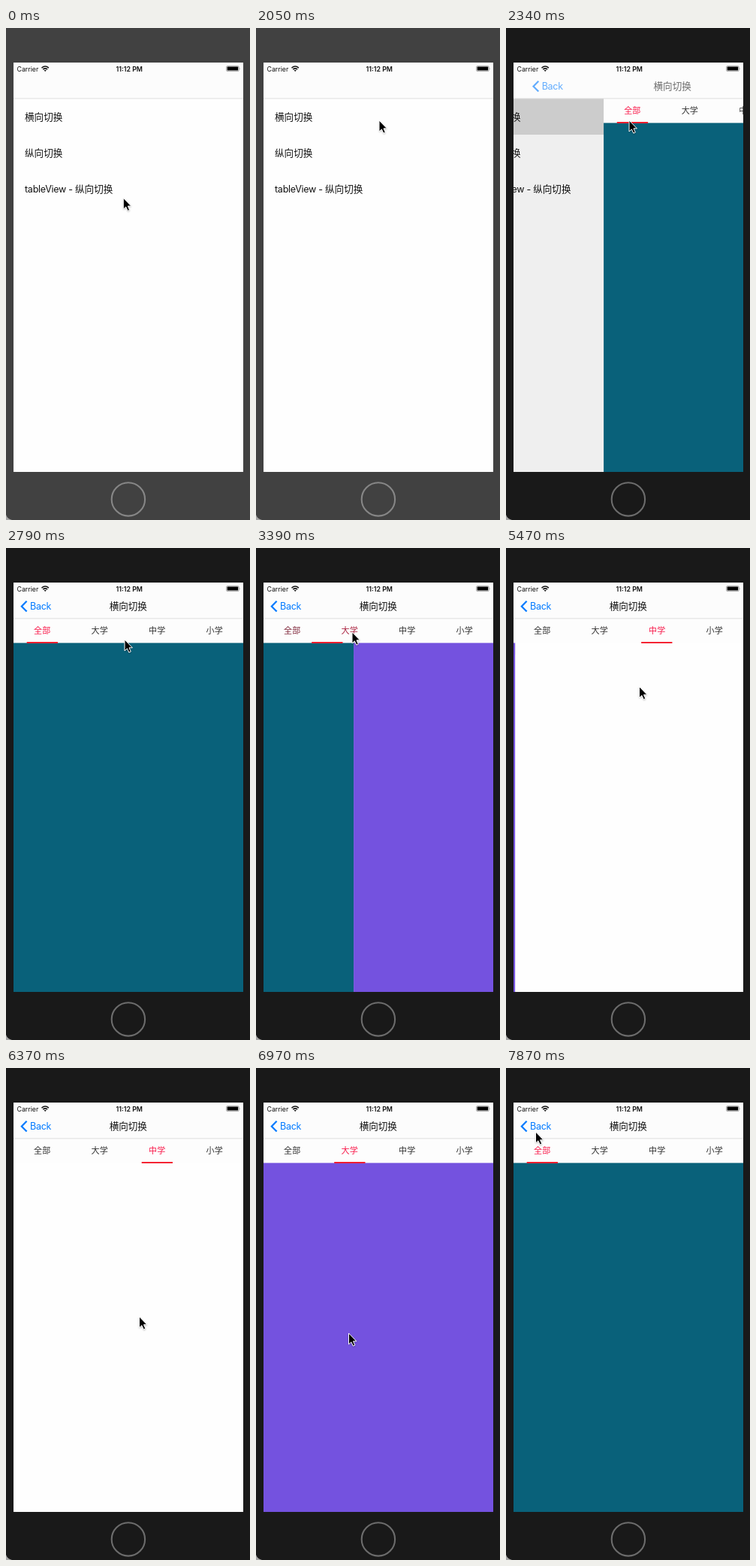
An HTML page that plays this animation: 325x655 px, repeating every 8000 ms.

```html
<!DOCTYPE html>
<html lang="zh-CN">
<head>
<meta charset="utf-8">
<style>
html, body { margin: 0; width: 100%; height: 100%; overflow: hidden; background: #191919; }
svg { display: block; width: 325px; height: 655px; }
text { font-family: Inter, "Noto Sans CJK SC", "Noto Sans CJK", sans-serif; font-size: 12.57px; fill: #111; }
.latin { letter-spacing: -.3px; }
.status { font-size: 8.8px; }
.tab { font-size: 11.1px; text-anchor: middle; }
.mid { text-anchor: middle; }
</style>
</head>
<body>
<svg viewBox="0 0 325 655">
  <defs>
    <clipPath id="screen"><rect x="10" y="46" width="306" height="545"/></clipPath>
    <filter id="soft" x="-50%" y="-50%" width="200%" height="200%"><feGaussianBlur stdDeviation=".8"/></filter>
  </defs>
  <rect id="bezel" width="325" height="655"/>
  <path d="M0 648Q2 653.5 8 655H0Z" fill="#a5a5a5"/>
  <circle id="home" cx="162.9" cy="627.4" r="22.2" fill="none" stroke-width="2.1"/>
  <g clip-path="url(#screen)">
    <rect x="10" y="46" width="306" height="545" fill="#fefefe"/>
    <g id="list">
      <rect x="10" y="94" width="306" height="497" fill="#fefefe"/>
      <rect id="pressed" x="10" y="94" width="306" height="48" fill="#d9d9d9"/>
      <text x="25" y="122.6">横向切换</text>
      <text x="25" y="170.6">纵向切换</text>
      <text x="25" y="218.6"><tspan class="latin">tableView - </tspan><tspan x="92">纵向切换</tspan></text>
    </g>
    <rect id="shade" x="10" y="94" width="306" height="497"/>
    <g id="detail">
      <rect x="10" y="94" width="306" height="33" fill="#fdfdfd"/>
      <g id="pages"></g>
      <g id="tabs"></g>
      <rect id="bar" y="125" width="41.3" height="1.8" fill="#f40f20"/>
    </g>
    <rect x="10" y="46" width="306" height="48" fill="#fcfcfc"/>
    <rect x="10" y="93.4" width="306" height="1" fill="#dedede"/>
    <g id="nav">
      <path d="M27.6 70.8L20.8 77.7L27.6 84.6" fill="none" stroke="#007aff" stroke-width="2.2"/>
      <text class="latin" x="32" y="82.2" style="fill:#007aff">Back</text>
    </g>
    <text id="title" class="mid" x="162.8" y="82" font-weight="500">横向切换</text>
    <text class="status" x="14.5" y="57.5">Carrier</text>
    <text class="status mid" x="164.2" y="57.5" font-weight="600">11:12 PM</text>
    <g fill="none" stroke="#111" stroke-width="1.5">
      <path d="M47.5 53.1Q52.2 48.9 56.9 53.1M49.3 55.1Q52.2 52.6 55.1 55.1"/>
      <path d="M52.2 58L50.6 56.3Q52.2 55 53.8 56.3Z" fill="#111" stroke="none"/>
    </g>
    <rect x="293.5" y="50.6" width="16.8" height="7" rx="1.5" fill="none" stroke="#888" stroke-width=".7"/>
    <rect x="294.6" y="51.6" width="14.6" height="5" rx=".7"/>
    <path d="M311 52.9Q312.3 54.1 311 55.3Z" fill="#888"/>
  </g>
  <g id="cursor">
    <path d="M0 1V16L3.6 13L6 18.5L8.6 17.3L6.2 12H11Z" opacity=".3" filter="url(#soft)"/>
    <path d="M0 0V14.9L3.4 11.8L5.8 17.1L8.3 16L6 10.8H10.4Z" stroke="#fff" stroke-linejoin="round"/>
  </g>
</svg>
<script>
const LOOP = 8000, STEP = 150, PHASE = 70, TAP = 2170, W = 306, TAB = W / 4;
const $ = id => document.getElementById(id);

// Moves are [start, end, ...values to reach]
const pointer = [
  [900, 1480, 163, 144], [1630, 2020, 164, 123], [2470, 2770, 158, 122],
  [2770, 3070, 128, 112], [3520, 3970, 209, 139], [3970, 4270, 201, 126],
  [5170, 5470, 177.5, 184.5], [5470, 6070, 124, 314],
  [6220, 6670, 200, 338], [6670, 6970, 123.5, 353],
  [7120, 7420, 190, 335], [7420, 7870, 39.5, 85]
];
const scroll = [[3220, 3780, 1], [5020, 5580, 2], [6370, 6930, 1], [7270, 7830, 0]];
const push = [[TAP, 2730, 1]];

const easeOut = f => 1 - (1 - f) ** 3;
const clamp = f => Math.min(1, Math.max(0, f));

// Ease from the first position through each move in turn
function follow(first, moves, t) {
  return moves.reduce((pos, [a, b, ...to]) => {
    const f = easeOut(clamp((t - a) / (b - a)));
    return pos.map((v, i) => v + (to[i] - v) * f);
  }, first);
}

const mix = (a, b, f) => `rgb(${a.map((v, i) => Math.round(v + (b[i] - v) * f))})`;
const move = (id, x, y = 0) => $(id).setAttribute("transform", `translate(${x} ${y})`);
const set = (id, name, value) => $(id).setAttribute(name, value);

$("pages").innerHTML = ["#09617a", "#7452df", "#fefefe"].map((c, i) =>
  `<rect x="${10 + i * W}" y="126.4" width="${W}" height="465" fill="${c}"/>`).join("");
$("tabs").innerHTML = ["全部", "大学", "中学", "小学"].map((s, i) =>
  `<text class="tab" x="${48.2 + i * TAB}" y="114.2">${s}</text>`).join("");
const labels = [...$("tabs").children];

function draw(time) {
  const t = PHASE + STEP * Math.floor((time - PHASE) / STEP);
  const [p] = follow([0], push, t), [s] = follow([0], scroll, t);
  const active = t >= TAP;

  set("bezel", "fill", active ? "#191919" : "#414141");
  set("home", "stroke", active ? "#6c6c6c" : "#868686");
  set("pressed", "opacity", active ? 1 : 0);

  move("list", -.3 * W * p);
  set("shade", "opacity", .1 * p);
  move("detail", W * (1 - p));
  move("nav", 40 * (1 - p));
  move("title", 150 * (1 - p));
  set("nav", "opacity", p);
  set("title", "opacity", p);

  move("pages", -W * s);
  set("bar", "x", 27.7 + TAB * s);
  labels.forEach((el, i) => {
    el.style.fill = mix([51, 51, 51], [249, 28, 76], clamp(1 - Math.abs(s - i)));
  });

  move("cursor", ...follow([156.3, 226.3], pointer, t));
}

const start = performance.now();
function frame() {
  draw((performance.now() - start) % LOOP);
  requestAnimationFrame(frame);
}
frame();
</script>
</body>
</html>
```
